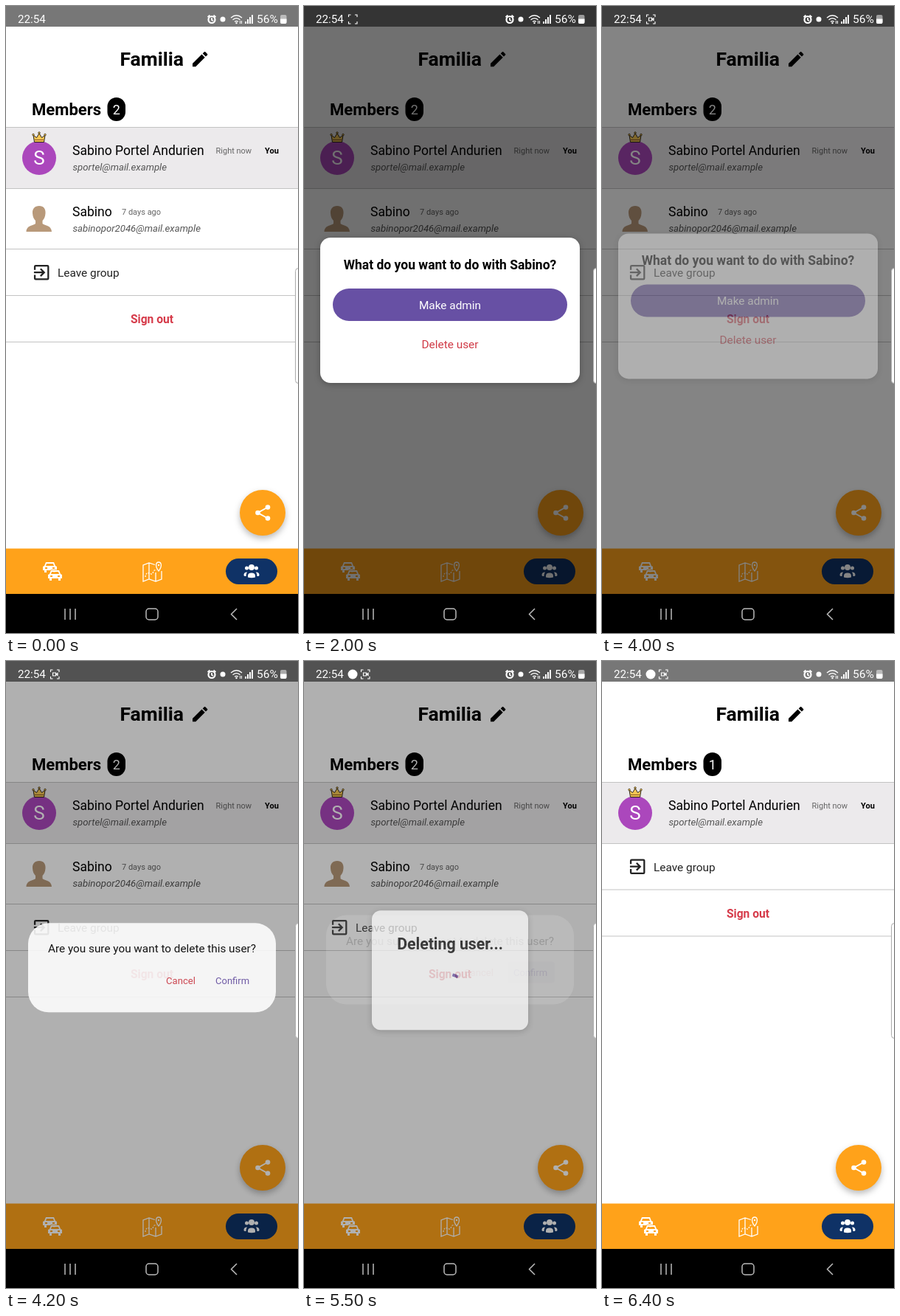
Recreate the animation shown at these times as an HTML page. Size 396 by 850 pixels, loop 6.5 s.

```html
<!DOCTYPE html>
<html lang="en">
<head>
<meta charset="utf-8">
<title>Group members</title>
<style>
  html, body { margin: 0; width: 100%; height: 100%; overflow: hidden; background: #fff; }
  svg { display: block; width: 396px; height: 850px; font-family: Roboto, "Open Sans", sans-serif; }
  .b { font-weight: 700; }
  .m { text-anchor: middle; }
  .name { font-size: 17.5px; }
  .mail { font-size: 13.2px; font-style: italic; fill: #555; }
  .small { font-size: 11px; fill: #666; }
  .rule { stroke: #c3c3c3; }
  .box { fill: #fff; }
  .raised { filter: drop-shadow(0 2px 4px #0004); }
  .line { fill: none; stroke: #fff; stroke-width: 1.3; }
</style>
</head>
<body>
<svg viewBox="0 0 396 850">
  <defs>
    <path id="car" fill-rule="evenodd" d="M4 1h11l2 5 2 1v5h-2v3h-3v-3H5v3H2v-3H0V7l2-1zM5 3 4 6h11l-1-3zM3 8v2h3V8zM13 8v2h3V8z"/>
  </defs>
  <rect width="396" height="850" fill="#fff"/>
  <rect width="396" height="28" fill="#777"/>

  <!-- Header -->
  <text class="b" x="154.500" y="81" font-size="26.500">Familia</text>
  <path transform="translate(249.6 58.6) scale(1.13)" d="M3 17.25V21h3.75L17.81 9.94l-3.75-3.75zM20.71 7.04a1 1 0 0 0 0-1.41l-2.34-2.34a1 1 0 0 0-1.41 0l-1.83 1.83 3.75 3.75z"/>
  <text class="b" x="35" y="148" font-size="22.1">Members</text>
  <rect x="137.500" y="124" width="24.500" height="32" rx="12.200"/>
  <text id="count" class="m" x="149.700" y="146.5" font-size="18" fill="#fff">2</text>

  <!-- Members -->
  <rect y="164" width="396" height="84" fill="#eceaec"/>
  <path class="rule" d="M0 164.5h396M0 247.5h396"/>
  <circle cx="45" cy="206" r="23" fill="#ab47bc"/>
  <text class="m" x="45" y="215" font-size="26" fill="#fff">S</text>
  <path d="M38.5 184.5 37 175l4.5 3.5 3.5-6 3.5 6 4.5-3.5-1.5 9.5z" fill="#f3c553" stroke="#2b2418" stroke-linejoin="round"/>
  <path d="M39 181.5h12" stroke="#8a5a20"/>
  <g fill="#f3c553" stroke="#2b2418" stroke-width=".7">
    <circle cx="37" cy="174.5" r="1.3"/><circle cx="45" cy="172" r="1.3"/><circle cx="53" cy="174.5" r="1.3"/>
  </g>
  <text class="name" x="90" y="202">Sabino Portel Andurien</text>
  <text class="mail" x="90.5" y="223">sportel@mail.example</text>
  <text class="small" x="284.5" y="200">Right now</text>
  <text class="small b" x="351" y="200" style="fill:#000">You</text>

  <g id="member">
    <path d="M45 271c6 0 9 4 8.500 10-.3 5-2 8-4 10v4c3 3 12 2 12.500 11H27.500c.5-9 9.500-8 12.500-11v-4c-2-2-3.700-5-4-10-.5-6 3-10 9-10z" fill="#b8997a"/>
    <text class="name" x="90" y="285">Sabino</text>
    <text class="small" x="157" y="283">7 days ago</text>
    <text class="mail" x="90.5" y="305.5">sabinopor2046@mail.example</text>
    <path class="rule" d="M0 329.5h396"/>
  </g>
  <g id="actions">
    <path transform="translate(34.5 347.5) scale(1.14)" fill="#222" d="M10.09 15.59 11.5 17l5-5-5-5-1.41 1.41L12.67 11H3v2h9.67zM19 3H5a2 2 0 0 0-2 2v4h2V5h14v14H5v-4H3v4a2 2 0 0 0 2 2h14a2 2 0 0 0 2-2V5a2 2 0 0 0-2-2z"/>
    <text x="70" y="367" font-size="15.4" fill="#222">Leave group</text>
    <text class="b m" x="198" y="430" font-size="15.6" fill="#d63b4a">Sign out</text>
    <path class="rule" d="M0 392.5h396M0 455.5h396"/>
  </g>

  <!-- Share button and tabs -->
  <circle cx="348" cy="687" r="31" fill="#ffa21a" style="filter:drop-shadow(0 4px 4px #0004)"/>
  <path class="line" style="stroke-width:2" d="m355 679.5-13.500 7.500 13.500 7.500"/>
  <g fill="#fff"><circle cx="355" cy="679.5" r="3.3"/><circle cx="341.5" cy="687" r="3.3"/><circle cx="355" cy="694.5" r="3.3"/></g>
  <rect y="735.5" width="396" height="61.5" fill="#ffa21a"/>
  <g fill="#fff" stroke="#ffa21a" stroke-width="1.5" paint-order="stroke">
    <use href="#car" x="50" y="753"/><use href="#car" x="57" y="764"/>
  </g>
  <path class="line" d="M202 757.5 194 755l-8 3v22l8-3 9 3 8-3v-11M194 755v22M203 768v12"/>
  <path class="line" stroke-dasharray="2 1.5" d="M189 774c1-8 5-5 8-4s2-7 7-5"/>
  <path class="line" d="M207 766c-5-6-4-12 0-12s5 6 0 12z"/>
  <circle cx="207" cy="758" r="1.2" fill="#fff"/>
  <rect x="298" y="749" width="70" height="35" rx="17.5" fill="#0f3266"/>
  <g fill="#fff">
    <circle cx="333" cy="761" r="4"/><circle cx="326.5" cy="762" r="2.5"/><circle cx="339.5" cy="762" r="2.5"/>
    <path d="M328 774.5v-2q0-4 5-4t5 4v2q-5 1.500-10 0zM322.500 771.500q0-4 4.500-4-1.500 2-1.500 5.500-3 0-3-1.500zM343.500 771.500q0-4-4.500-4 1.500 2 1.500 5.500 3 0 3-1.500z"/>
  </g>

  <rect id="scrim" width="396" height="797" opacity="0"/>

  <!-- System bars -->
  <g fill="#fff">
    <text x="16" y="23" font-size="15.2">22:54</text>
    <text x="340" y="23" font-size="15.5">56%</text>
    <circle id="chat" cx="66" cy="18" r="6.5"/>
    <g id="rec" opacity="0">
      <path class="line" style="stroke-width:1.1" d="M60.5 15v-3h3M69 12h3v3M72 21v3h-3M63.5 24h-3v-3"/>
      <path id="lens" class="line" style="stroke-width:1.1" d="M63.5 16h4v4h-4zM67.5 18l2.5-1.5v3z"/>
    </g>
    <circle cx="279" cy="18.5" r="4.5" class="line" style="stroke-width:2.200"/>
    <path class="line" style="stroke-width:1.700" d="M279 16v3l2 1M273.5 15l3-2.5M284.500 15l-3-2.5"/>
    <circle cx="294" cy="18" r="3.5"/>
    <path class="line" d="M305 16q7.5-6.5 15 0M307.5 18.7q5-4 10 0M310 21.3q2.5-2 5 0"/>
    <circle cx="312.5" cy="23" r="1.2"/>
    <path d="M317 20h1v4h-1zM319 20h1v4h-1zM324 21h2v3h-2zM327 18h2v6h-2zM330 15h2v9h-2zM333 12h2v12h-2z"/>
    <rect x="372" y="12" width="8.5" height="12" rx="2" opacity=".5"/>
    <path d="M372 17.5h8.5v4.5q0 2-2 2H374q-2 0-2-2z"/>
  </g>
  <rect y="797" width="396" height="53"/>
  <path d="M80 817v15M87 817v15M94 817v15M313 817l-7.5 7.5 7.5 7.5" fill="none" stroke="#bbb" stroke-width="1.5"/>
  <rect x="190" y="817" width="16" height="15" rx="4" fill="none" stroke="#bbb" stroke-width="1.5"/>

  <!-- Dialogs -->
  <g id="choice">
    <rect class="box raised" x="22" y="314" width="352" height="197" rx="14"/>
    <text class="b m" x="198" y="357" font-size="17.5">What do you want to do with Sabino?</text>
    <rect x="39" y="383" width="318" height="44" rx="22" fill="#6750a4"/>
    <text class="m" x="198" y="411" font-size="15.4" fill="#fff">Make admin</text>
    <text class="m" x="198" y="463.5" font-size="15.4" fill="#d03a46">Delete user</text>
  </g>
  <g id="confirm">
    <rect class="box" x="30" y="352" width="336" height="121" rx="28"/>
    <rect id="press" x="276" y="415" width="64" height="29" rx="4" fill="#6750a4"/>
    <text class="m" x="198" y="392" font-size="15.3">Are you sure you want to delete this user?</text>
    <text x="217" y="434.5" font-size="13.1" fill="#d03a46">Cancel</text>
    <text x="284" y="434.5" font-size="13" fill="#6750a4">Confirm</text>
  </g>
  <g id="busy">
    <rect class="box raised" x="92" y="332" width="212" height="162" rx="12"/>
    <text class="b m" x="198" y="384.5" font-size="21.3">Deleting user...</text>
    <path id="spinner" fill="none" stroke="#6750a4" stroke-width="4" stroke-linecap="square"/>
  </g>

  <rect x="392.5" y="355.5" width="20" height="156" rx="4" fill="#fff" stroke="#aaa"/>
</svg>
<script>
const LOOP = 6500, STEP = 100;
const $ = id => document.getElementById(id);
const ramp = (t, a, b) => Math.min(1, Math.max(0, (t - a) / (b - a)));
const smooth = x => x * x * (3 - 2 * x);
const show = (id, on) => $(id).setAttribute("opacity", +on);

// Dialogs rise as they fade in and keep drifting up as they fade out.
function dialog(id, t, in0, in1, out0, out1) {
  const enter = smooth(ramp(t, in0, in1)), leave = ramp(t, out0, out1);
  show(id, enter * (1 - leave));
  const y = 12 * (1 - enter) ** 0.6 - 8.5 * leave;
  $(id).setAttribute("transform", `translate(0 ${y})`);
}

function spin(t) {
  const time = Math.max(0, t - 5420) / 1332, u = time % 1;
  const base = 286 * time + 290 * Math.floor(time);
  const tail = base + 290 * smooth(ramp(u, 0.5, 1));
  const head = base + 290 * smooth(ramp(u, 0, 0.5)) + 1;
  const at = deg => {
    const a = deg * Math.PI / 180;
    return `${198 + 18 * Math.sin(a)} ${437 - 18 * Math.cos(a)}`;
  };
  $("spinner").setAttribute("d", `M${at(tail)}A18 18 0 ${+(head - tail > 180)} 1 ${at(head)}`);
}

function draw(t) {
  const removed = t >= 6000, chat = t >= 5200;
  show("scrim", 0.6 * ramp(t, 1700, 2020) - 0.29 * ramp(t, 3900, 4150) - 0.31 * ramp(t, 5800, 6100));
  dialog("choice", t, 1700, 1970, 3850, 4080);
  dialog("confirm", t, 4000, 4255, 5330, 5525);
  dialog("busy", t, 5340, 5600, 5800, 6060);
  show("press", 0.14 * ramp(t, 5050, 5200));
  spin(t);
  show("rec", t >= 300);
  show("lens", t < 1900 || t >= 2400);
  show("chat", chat);
  $("rec").setAttribute("transform", `translate(${chat ? 17 : 0} 0)`);
  show("member", !removed);
  $("actions").setAttribute("transform", `translate(0 ${removed ? -82.5 : 0})`);
  $("count").textContent = removed ? 1 : 2;
}

const start = performance.now();
function frame() {
  const t = (performance.now() - start) % LOOP;
  draw(Math.floor(t / STEP) * STEP);
  requestAnimationFrame(frame);
}
frame();
</script>
</body>
</html>
```
